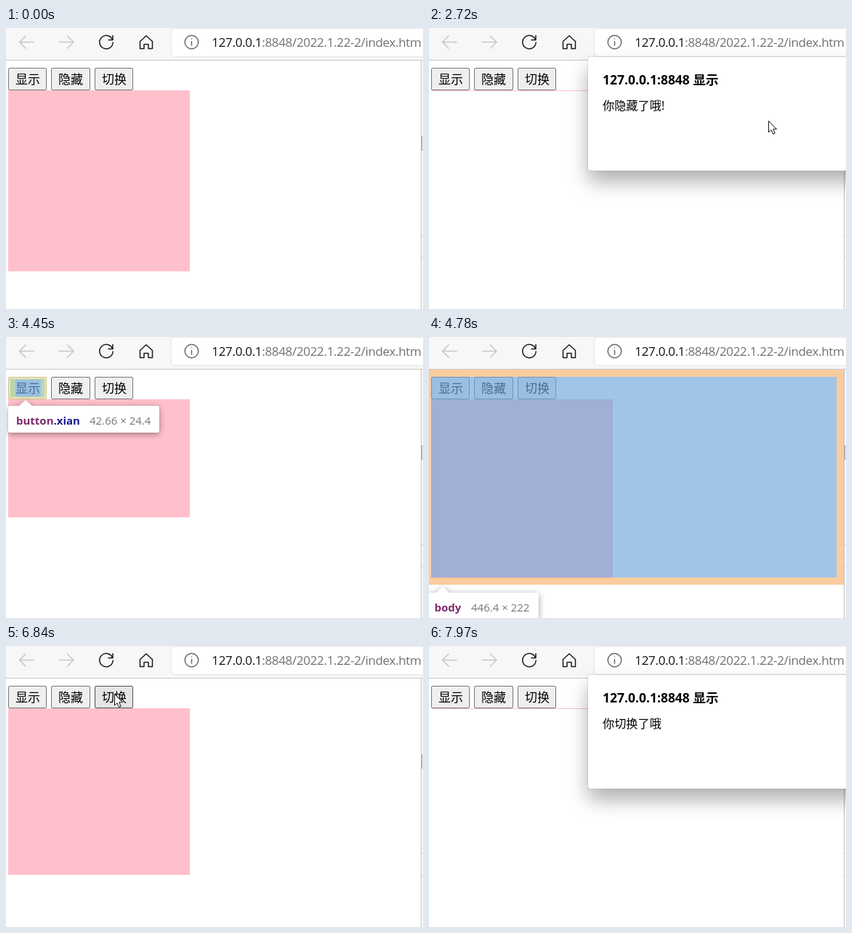
Recreate the animation shown at these times as an HTML page. Size 574 px wide and 388 px high, loop 8 s.

```html
<!DOCTYPE html>
<html lang="zh-CN">
<head>
<meta charset="utf-8">
<title>slide demo</title>
<style>
  html, body { margin: 0; width: 100%; height: 100%; overflow: hidden; background: #fff; }
  svg { display: block; width: 574px; height: 388px; }
  text { font-family: "Open Sans", "Noto Sans CJK SC", "Noto Sans CJK", sans-serif; white-space: pre; }
  .icon { fill: none; stroke-width: 1.5; stroke-linecap: round; stroke-linejoin: round; }
  .btn rect { fill: #efefef; stroke: #767676; }
  .btn.hover rect { fill: #e5e5e5; stroke: #4f4f4f; }
  .btn.down rect { fill: #f5f5f5; stroke: #8d8d8d; }
  .btn text { font: 17px "Noto Sans CJK SC", "Noto Sans CJK", sans-serif; }
  .tip { filter: drop-shadow(0 2px 4px rgba(0,0,0,.4)); }
  .tip text { font-size: 15px; fill: #777; }
  .tip .tag { font-weight: 700; fill: #7d2a6c; }
  .tip .cls { font-weight: 700; fill: #1a1a8c; }
  .panel { filter: drop-shadow(0 15px 14px rgba(0,0,0,.27)) drop-shadow(0 0 1px rgba(0,0,0,.22)); }
</style>
</head>
<body>
<svg viewBox="0 0 574 388">
  <rect width="574" height="388" fill="#fff"/>

  <!-- page -->
  <rect id="box" x="3" y="86" width="250" fill="#ffc0cb"/>
  <g id="buttons"></g>

  <!-- inspector highlights -->
  <g id="btnMark">
    <path fill="rgba(255,229,153,.66)" fill-rule="evenodd" d="M3 55H56V86H3ZM5.5 57.5V83.5H53.5V57.5Z"/>
    <path fill="rgba(147,196,125,.55)" fill-rule="evenodd" d="M5.5 57.5H53.5V83.5H5.5ZM13 59V82H48V59Z"/>
    <rect x="13" y="59" width="35" height="23" fill="rgba(111,168,220,.66)"/>
    <g class="tip">
      <path fill="#fff" d="M6 95H18L27 87L36 95H208a3 3 0 0 1 3 3V129a3 3 0 0 1 -3 3H6a3 3 0 0 1 -3 -3V98a3 3 0 0 1 3 -3Z"/>
      <text x="14" y="121"><tspan class="tag">button</tspan><tspan class="cls">.xian</tspan></text>
      <text x="115" y="121">42.66 × 24.4</text>
    </g>
  </g>
  <g id="bodyMark">
    <path id="margin" fill="rgba(246,178,107,.66)" fill-rule="evenodd"/>
    <rect id="content" x="3" y="55" width="558" fill="rgba(111,168,220,.66)"/>
    <g id="bodyTip" class="tip">
      <path fill="#fff" d="M-4 21H10L19 12L28 21H148a3 3 0 0 1 3 3V55a3 3 0 0 1 -3 3H-4Z"/>
      <text class="tag" x="7.500" y="47">body</text>
      <text id="size" x="58" y="47"></text>
    </g>
  </g>

  <!-- side panel edge -->
  <rect x="571" y="45" width="3" height="343" fill="#fff"/>
  <path d="M571.5 45V388" stroke="#bdbdbd"/>
  <path d="M574 150.5H572.5V168.5H574" fill="none" stroke="#9a9a9a"/>
  <path d="M572 286.5H574M572 316.5H574" stroke="#cfcfcf"/>

  <!-- toolbar -->
  <rect width="574" height="44" fill="#f7f7f7"/>
  <rect y="44" width="574" height="1" fill="#c9c9c9"/>
  <rect x="228" y="1" width="360" height="38" rx="5" fill="#fff" style="filter:drop-shadow(0 0 1px rgba(0,0,0,.18))"/>
  <g class="icon" stroke="#c6c6c6">
    <path d="M38 19.5H18.5M27 11L18.5 19.5L27 28"/>
    <path d="M73.500 19.500H93M84.500 11L93 19.500L84.500 28"/>
  </g>
  <g class="icon" stroke="#1b1b1b">
    <path d="M146.500 16A9.200 9.200 0 1 0 147.200 20M147 10.500V16.500H141"/>
    <path d="M184.500 18.500L193 10.800L201.500 18.500V28.500H196V22.500H190V28.500H184.500Z"/>
  </g>
  <g class="icon" stroke="#6a6a6a">
    <circle cx="255.500" cy="19.500" r="9.300"/>
    <path d="M255.500 18.500V24M255.500 15V15.100"/>
  </g>
  <text x="283.300" y="26" font-size="17" letter-spacing="-.33" fill="#707070"><tspan fill="#111">127.0.0.1</tspan>:8848/2022.1.22-2/index.htm</text>

  <!-- alert -->
  <g id="alert">
    <rect class="panel" x="219" y="40" width="440" height="157" rx="4" fill="#fff"/>
    <text x="239" y="78" font-size="17.500" font-weight="700">127.0.0.1:8848 显示</text>
    <text id="msg" x="239" y="113" font-size="16.200"></text>
  </g>

  <path id="cursor" fill="#fff" stroke="#111" stroke-linejoin="round"
        d="M.5 .5V16L4 12.700L6.600 18.500L9.200 17.300L6.700 11.700H11.500Z"/>
</svg>
<script>
const LOOP = 8000, TICK = 66.4, SLIDE = 993;
const $ = id => document.getElementById(id);

const labels = ['显示', '隐藏', '切换'];
const lefts = [3, 62, 122], rights = [56, 116, 175];
$('buttons').innerHTML = labels.map((s, i) =>
  `<g class="btn"><rect x="${lefts[i] + .5}" y="55.5" width="${rights[i] - lefts[i] - 1}" height="30" rx="1.5"/>
   <text x="${lefts[i] + 10}" y="77">${s}</text></g>`).join('');
const buttons = [...document.querySelectorAll('.btn')];

// pointer paths: [time, x, y]; the pointer is hidden between paths
const paths = [
  [[130, 326, 345], [325, -8, 175]],
  [[590, 1, 36], [920, 78, 76], [2050, 78, 76], [2250, 44, 62], [2500, 44, 62], [2780, 576, 145]],
  [[3310, 574, 130], [3650, 36, 82], [3990, 36, 82], [4250, 576, 170]],
  [[5378, 572, 135], [5510, 307, 82], [5650, 577, 132]],
  [[6240, 574, 125], [6600, 149, 66], [7150, 149, 66], [7600, 288, 90], [7780, 288, 90]]
];

// alerts: fade in start, fade out start, message
const alerts = [
  { from: 2150, to: 3150, text: '你隐藏了哦!' },
  { from: 4870, to: 6080, text: '你显示了哦!' },
  { from: 7800, to: 9000, text: '你切换了哦' }
];
const presses = [[1060, 1120], [3780, 3840], [6730, 6800]];

const clamp = v => Math.max(0, Math.min(1, v));
const within = (t, a, b) => t >= a && t < b;
const show = (el, on) => { el.style.display = on ? '' : 'none'; };

function boxHeight(t) {
  if (t < 3180) return Math.max(1, 250 * (1 - clamp((t - 1096) / SLIDE)));
  if (t < 3801) return 0;
  if (t < 6170) return Math.min(247.75, 250 * clamp((t - 3801) / SLIDE));
  return Math.max(1, 250 * (1 - clamp((t - 6760) / SLIDE)));
}

function pointer(t) {
  const path = paths.find(p => within(t, p[0][0], p[p.length - 1][0]));
  if (!path) return null;
  const i = path.findIndex(p => p[0] > t);
  const [t0, x0, y0] = path[i - 1], [t1, x1, y1] = path[i];
  const k = (t - t0) / (t1 - t0);
  return [Math.round(x0 + (x1 - x0) * k), Math.round(y0 + (y1 - y0) * k)];
}

function draw(ms) {
  const t = Math.floor((ms + 12) / TICK) * TICK;
  const h = boxHeight(t);
  $('box').setAttribute('height', Math.round(h));

  const open = alerts.find(a => within(t, a.from, a.to + 150));
  show($('alert'), open);
  if (open) {
    $('msg').textContent = open.text;
    $('alert').style.opacity = Math.min(clamp((t - open.from) / 150), 1 - clamp((t - open.to) / 150));
  }

  const pos = pointer(t);
  show($('cursor'), pos);
  if (pos) $('cursor').setAttribute('transform', `translate(${pos})`);
  const down = presses.some(p => within(t, ...p));
  buttons.forEach((b, i) => {
    const over = pos && !open && within(pos[0], lefts[i], rights[i]) && within(pos[1], 55, 86);
    b.classList.toggle('hover', !!over);
    b.classList.toggle('down', !!over && down);
  });

  show($('btnMark'), within(t, 4370, 4570));
  const body = within(t, 4570, 6170);
  show($('bodyMark'), body);
  if (body) {
    const end = Math.floor(86 + h);
    $('content').setAttribute('height', end - 55);
    $('margin').setAttribute('d', `M0 45H571V${end + 10}H0ZM3 55V${end}H561V55Z`);
    $('bodyTip').setAttribute('transform', `translate(0 ${end})`);
    $('size').textContent = '446.4 × ' + Math.round((31 + h) / 1.25);
  }
}

const start = performance.now();
function frame() {
  draw((performance.now() - start) % LOOP);
  requestAnimationFrame(frame);
}
frame();
</script>
</body>
</html>
```
